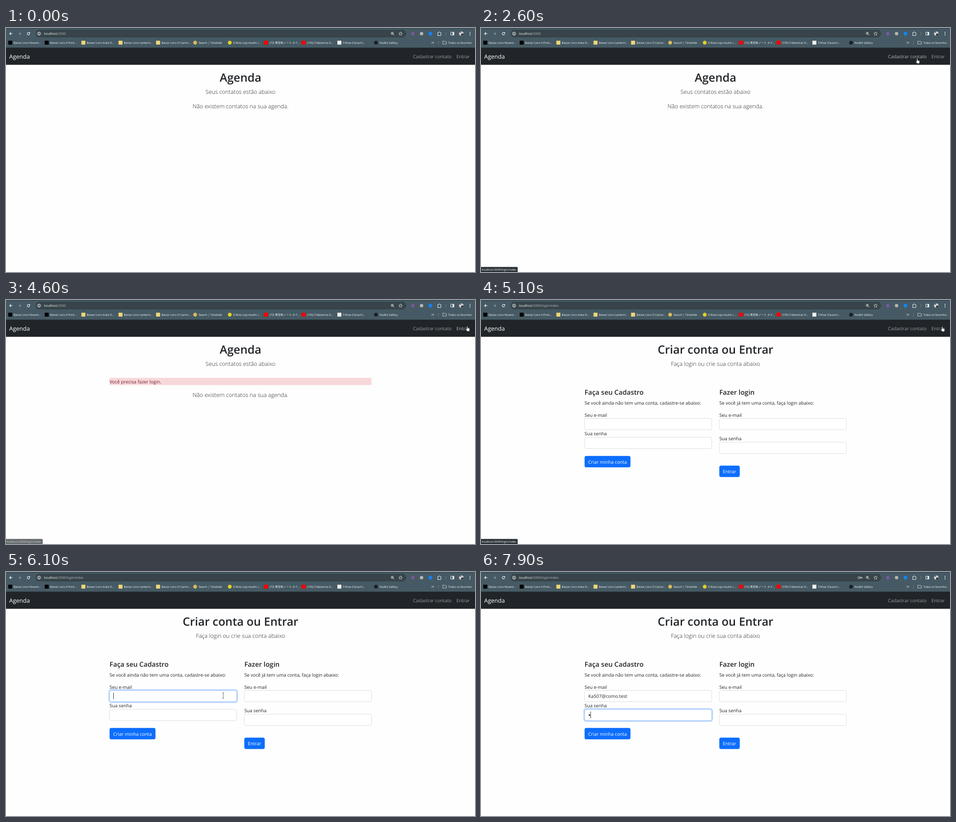
An HTML page with a canvas that plays this animation: 1036 by 541 pixels, repeating every 8000 ms.

```html
<!DOCTYPE html>
<html lang="pt-BR">
<head>
<meta charset="utf-8">
<title>Agenda</title>
<style>
html, body { margin: 0; width: 100%; height: 100%; overflow: hidden; background: #fefefe; }
canvas { display: block; }
</style>
</head>
<body>
<canvas id="stage" width="1036" height="541"></canvas>
<script>
const ctx = document.getElementById('stage').getContext('2d');
const LOOP = 8000;
const FONT = '"Open Sans", "Noto Sans", "Noto Sans CJK JP", sans-serif';
const BODY = 10.23, LEAD = 12.62, TINY = 6.1;
const INK = '#212529', BLUE = '#0d6efd', PALE = '#e9edef';
const EMAIL = 'Ka507@como.test';
const SUGGESTIONS = [EMAIL, 'scasaventosul638@como.test', 'montelargos417@como.test',
  'rato@como.test', 'prova7@poro.test', 'folhas@como.test'];
const BOOKMARKS = [
  [5, 'Baixar Livro Nuvem...', '#000', 'square'],
  [85.5, 'Baixar Livro A Pont...', '#000', 'square'],
  [166.5, 'Baixar Livro Areia D...', '#efd676', 'square'],
  [248.5, 'Baixar Livro Lanterni...', '#efd676', 'square'],
  [331.5, 'Baixar Livro O Camin...', '#efd676', 'square'],
  [413.5, 'Search | TintaVale', '#d9b95a', 'circle'],
  [490, 'E-Rota Loja Azulim |...', '#e3d21f', 'circle'],
  [570, '(73) 青空係ノート メイ...', '#f00', 'square'],
  [653, '(195) 5 Maneiras D...', '#f00', 'square'],
  [732, 'Trilhas Claras/U...', '#eee', 'square'],
  [813, 'Nodkit Gallery', '#1b1f23', 'circle']
];

// time, x, y, shape; a null shape hides the pointer from that time on
const POINTER = [
  [900, 52, 1, 'arrow'], [1200, 998, 120, 'arrow'], [1600, 864, 296, 'arrow'],
  [1700, 864, 296, 'arrow'], [1900, 864, 282, 'arrow'], [2000, 864, 282, 'arrow'],
  [2400, 1010, 66, 'hand'], [2700, 939, 68, 'hand'], [3600, 939, 68, 'hand'],
  [4100, 1004, 63, 'hand'], [4400, 1024, 55, 'arrow'], [4500, 1024, 55, 'arrow'],
  [4600, 1018, 58, 'hand'], [5300, 1018, 59, 'hand'], [5400, 960, 118, 'arrow'],
  [5700, 735, 228, null], [5900, 480, 274, 'beam'], [6300, 480, 274, 'beam'],
  [6500, 325, 294, 'arrow'], [6600, 308, 304, 'arrow'], [6700, 308, 304, 'arrow'],
  [6800, 350, 309, 'beam'], [7000, 491, 317, 'beam'], [7900, 491, 317, null]
];

function text(str, x, y, size, color = INK, weight = 400, align = 'left') {
  ctx.font = `${weight} ${size}px ${FONT}`;
  ctx.textAlign = align;
  ctx.fillStyle = color;
  ctx.fillText(str, x, y);
}

function rect(x, y, w, h, color) {
  ctx.fillStyle = color;
  ctx.fillRect(x, y, w, h);
}

function rounded(x, y, w, h, r, fill, stroke, width = 1) {
  ctx.beginPath();
  ctx.roundRect(x, y, w, h, r);
  paint(fill, stroke, width);
}

function circle(x, y, r, fill, stroke, width = 1) {
  ctx.beginPath();
  ctx.arc(x, y, r, 0, Math.PI * 2);
  paint(fill, stroke, width);
}

function shape(d, x, y, fill, stroke, width = 1) {
  ctx.save();
  ctx.translate(x, y);
  const path = new Path2D(d);
  if (fill) { ctx.fillStyle = fill; ctx.fill(path); }
  if (stroke) { ctx.strokeStyle = stroke; ctx.lineWidth = width; ctx.stroke(path); }
  ctx.restore();
}

function paint(fill, stroke, width) {
  if (fill) { ctx.fillStyle = fill; ctx.fill(); }
  if (stroke) { ctx.strokeStyle = stroke; ctx.lineWidth = width; ctx.stroke(); }
}

function withAlpha(alpha, draw) {
  if (alpha <= 0) return;
  ctx.save();
  ctx.globalAlpha = Math.min(1, alpha);
  draw();
  ctx.restore();
}

const between = (t, from, to) => t >= from && t < to;

function star(x, y, r) {
  ctx.beginPath();
  for (let i = 0; i < 10; i++) {
    const a = -Math.PI / 2 + i * Math.PI / 5, d = i % 2 ? r * 0.45 : r;
    ctx.lineTo(x + d * Math.cos(a), y + d * Math.sin(a));
  }
  ctx.closePath();
  paint(null, PALE, 0.8);
}

function drawToolbar(t) {
  rect(0, 0, 1036, 44, '#455a64');
  rect(0, 0, 1036, 2, '#3b4d56');
  shape('M3.2 0H-3M0 -3L-3 0L0 3', 11, 12.5, null, '#fff', 1.1);
  shape('M-3.2 0H3M0 -3L3 0L0 3', 30, 12.5, null, '#84939a', 1.1);
  if (between(t, 3100, 3400) || between(t, 5000, 5100)) {
    shape('M-2.6 -2.6L2.6 2.6M2.6 -2.6L-2.6 2.6', 50, 12.5, null, '#fff', 1.1);
  } else {
    shape('M2.6 1A2.8 2.8 0 1 1 2 -2', 49.7, 12.6, null, '#fff', 1.1);
    shape('M3.4 -3.6V-0.4H0.2Z', 49.7, 12.6, '#fff');
  }

  rounded(65, 4, 819, 17, 8.5, '#37444a');
  circle(73, 12.5, 5.6, '#455259');
  circle(73, 12.5, 3.3, null, '#fff', 0.9);
  rect(72.5, 12, 1, 2.6, '#fff');
  rect(72.5, 10.4, 1, 1, '#fff');
  text('localhost', 84, 15, 7.1, '#fff');
  const host = ctx.measureText('localhost').width;
  text(t >= 5100 ? ':3000/login/index' : ':3000', 84 + host, 15, 7.1, '#b4bdc1');

  if (t >= 7900) {
    circle(834.7, 12.6, 2.2, null, PALE, 0.9);
    shape('M2.2 -1H7.2V1.2H2.2', 834.7, 12.6, null, PALE, 0.9);
  }
  circle(853.3, 11.8, 2.6, null, PALE, 0.9);
  shape('M2 2L4.6 4.6M-1.3 0H1.3M0 -1.3V1.3', 853.3, 11.8, null, PALE, 0.9);
  star(871.6, 12.7, 4.3);

  circle(898.5, 12.5, 3.8, '#80559c');
  circle(918, 12.5, 3.8, '#b8b4b0');
  circle(937.5, 12.5, 4.2, '#1583f0');
  shape('M-3.5 -2.5H-1C-1 -5 1.5 -5 1.5 -2.5H3.5V0C5 0 5 2 3.5 2V4H-3.5V2C-2 2 -2 -.5 -3.5 -.5Z',
    957, 12.7, null, '#fff', 1);
  rect(971, 9, 1, 7, '#6d7e86');
  rounded(982.5, 9.3, 7, 6.4, 0.7, null, '#fff', 1);
  rect(986.5, 9.3, 3, 6.4, '#fff');
  circle(1005.8, 12.5, 5, '#d7d8d8');
  ctx.save();
  circle(1005.8, 12.5, 5);
  ctx.clip();
  circle(1008.5, 15.5, 3.6, '#353a3d');
  circle(1004, 9, 1.8, '#5c6163');
  ctx.restore();
  for (const y of [9.5, 12.5, 15.5]) circle(1025, y, 0.9, '#fff');

  for (const [x, label, color, form] of BOOKMARKS) {
    if (form === 'circle') circle(x + 4.3, 32.5, 4.2, color);
    else rect(x, 28.2, 8.8, 8.6, color);
    text(label, x + 12, 34.7, TINY, '#fff');
  }
  shape('M-2.4 -2L-.4 0L-2.4 2M.6 -2L2.6 0L.6 2', 942.7, 32.5, null, '#fff', 0.9);
  rect(955, 28.5, 1, 8, '#6d7e86');
  shape('M0 0H3L4 1H8V6.4H0Z', 964.8, 29.2, null, PALE, 0.8);
  text('Todos os favoritos', 977, 34.7, TINY, '#fff');
}

function navColor(glow) {
  return `rgba(255,255,255,${0.55 + 0.22 * glow})`;
}

function drawNavbar(t) {
  rect(0, 43.6, 1036, 38, INK);
  text('Agenda', 7, 67.8, 12.94, '#fff');
  const register = between(t, 2600, 2700) ? 0.5 :
    between(t, 2700, 3400) || between(t, 3700, 3900) ? 1 : 0;
  const enter = between(t, 4600, 4800) ? 0.6 :
    between(t, 2400, 2600) || between(t, 4000, 4400) || between(t, 4800, 5100) || between(t, 5300, 5400) ? 1 : 0;
  text('Cadastrar contato', 899, 67, BODY, navColor(register));
  text('Entrar', 995, 67, BODY, navColor(enter));
}

function drawHeading(title, lead) {
  text(title, 518, 119, 25.3, INK, 600, 'center');
  text(lead, 518, 146, LEAD, INK, 300, 'center');
}

function drawContacts(t) {
  drawHeading('Agenda', 'Seus contatos estão abaixo');
  const warned = t >= 3400;
  if (warned) {
    rect(228.7, 172.6, 578.6, 16, '#f8d7da');
    text('Você precisa fazer login.', 228.7, 185, BODY, '#6b2a31');
  }
  text('Não existem contatos na sua agenda.', 518, warned ? 215.2 : 177.5, LEAD, INK, 300, 'center');
}

function input(x, y, focus = 0) {
  withAlpha(focus, () => rounded(x - 2.7, y - 2.7, 286.4, 30.6, 6.5, '#c2dbfe'));
  rounded(x, y, 281, 25.2, 4, '#fff', focus > 0 ? '#86b7fe' : '#d3d8dd', 0.9);
}

function button(label, x, y, w) {
  rounded(x, y, w, 25.3, 4, BLUE);
  text(label, x + w / 2, y + 16.7, BODY, '#fff', 400, 'center');
}

function caret(x, y) {
  rect(x, y, 1, 14.5, INK);
}

function drawLogin(t) {
  drawHeading('Criar conta ou Entrar', 'Faça login ou crie sua conta abaixo');
  const left = 228.8, right = 526.4;
  text('Faça seu Cadastro', left, 210.4, 14.95, INK, 600);
  text('Fazer login', right, 210.4, 14.95, INK, 600);
  text('Se você ainda não tem uma conta, cadastre-se abaixo:', left, 231.5, BODY);
  text('Se você já tem uma conta, faça login abaixo:', right, 231.5, BODY);

  const emailFocus = between(t, 6100, 7200) ? 1 : between(t, 7200, 7300) ? 0.4 : 0;
  const passFocus = t >= 7300 ? 1 : t >= 7200 ? 0.5 : 0;
  const fields = [['Seu e-mail', left, 262.5, emailFocus], ['Sua senha', left, 304.4, passFocus],
    ['Seu e-mail', right, 262.5, 0], ['Sua senha', right, 315.2, 0]];
  for (const [label, x, y, focus] of fields) {
    input(x, y, focus);
    text(label, x, y - 4, BODY);
  }

  const filled = t >= 6600;
  if (filled) text(EMAIL, 237, 279, BODY);
  if (between(t, 6100, 7200)) {
    caret(filled ? 237 + ctx.measureText(EMAIL).width : 237, 267.5);
  }
  if (t >= 7900) circle(239.6, 317.2, 1.7, INK);
  if (between(t, 7200, 7600)) caret(237, 309.5);
  if (t >= 7900) caret(241.6, 309.5);

  button('Criar minha conta', left, 345.8, 101.4);
  button('Entrar', right, 367.3, 45.2);
  drawSuggestions(t);
}

function drawSuggestions(t) {
  const alpha = between(t, 6300, 6400) ? 0.5 : between(t, 6400, 6700) ? 1 : between(t, 6700, 6800) ? 0.63 : 0;
  withAlpha(alpha, () => {
    rounded(283, 296, 121, 118.5, 2, '#fff');
    if (between(t, 6600, 6700)) rect(283, 296.5, 121, 18.5, '#eeeff0');
    SUGGESTIONS.forEach((mail, i) => text(mail, 289, 307.9 + i * 19.1, 6.8, '#303336'));
    if (t >= 6600) shape('M-2.2 -2.2L2.2 2.2M2.2 -2.2L-2.2 2.2', 392, 305.5, null, '#222', 0.9);
  });
}

function drawStatus(t) {
  const login = between(t, 2400, 2700) || t >= 4000;
  const alpha = between(t, 4600, 4800) || between(t, 4000, 4100) ? 0.72 :
    between(t, 2400, 4400) || between(t, 4800, 5400) ? 1 : between(t, 5400, 5600) ? 0.5 : 0;
  withAlpha(alpha, () => {
    rounded(0, 529.7, login ? 81 : 88.6, 12, [0, 2, 0, 0], '#2d3438');
    const label = between(t, 3100, 3200) ? 'Aguardando localhost...' :
      `localhost:3000/${login ? 'login' : 'contato'}/index`;
    text(label, 1.5, 537.8, 6.2, '#fff');
  });
}

function drawPointer(t) {
  const next = POINTER.findIndex(key => key[0] > t);
  const i = next < 0 ? POINTER.length - 1 : next - 1;
  if (i < 0) return;
  const [t0, x0, y0, kind] = POINTER[i];
  if (!kind) return;
  const [t1, x1, y1] = POINTER[i + 1];
  const k = (t - t0) / (t1 - t0);
  const x = x0 + (x1 - x0) * k, y = y0 + (y1 - y0) * k;
  if (kind === 'arrow') {
    shape('M0 0V9L2 7.2L3.5 10.5L5 9.8L3.6 6.7H6.2Z', x, y + 0.5, '#fff', '#333', 0.8);
  } else if (kind === 'hand') {
    shape('M0 .8C0 -.4 1.8 -.4 1.8 .8V4L5.2 4.8Q6.4 5.2 6.2 6.6L5.6 11H1L-1.8 7.6C-2.4 6.4 -1 5.7 0 6.8Z',
      x, y + 0.3, '#fff', '#222', 0.6);
  } else {
    shape('M-2 -6H2M0 -6V6M-2 6H2', x, y, null, '#444', 0.8);
  }
}

function render() {
  // the screen refreshes ten times a second
  const t = Math.floor((performance.now() - start) % LOOP / 100) * 100;
  ctx.textRendering = 'geometricPrecision';
  rect(0, 0, 1036, 541, '#fefefe');
  drawToolbar(t);
  drawNavbar(t);
  if (t < 5100) drawContacts(t);
  else drawLogin(t);
  drawStatus(t);
  drawPointer(t);
  requestAnimationFrame(render);
}

const start = performance.now();
render();
</script>
</body>
</html>
```
